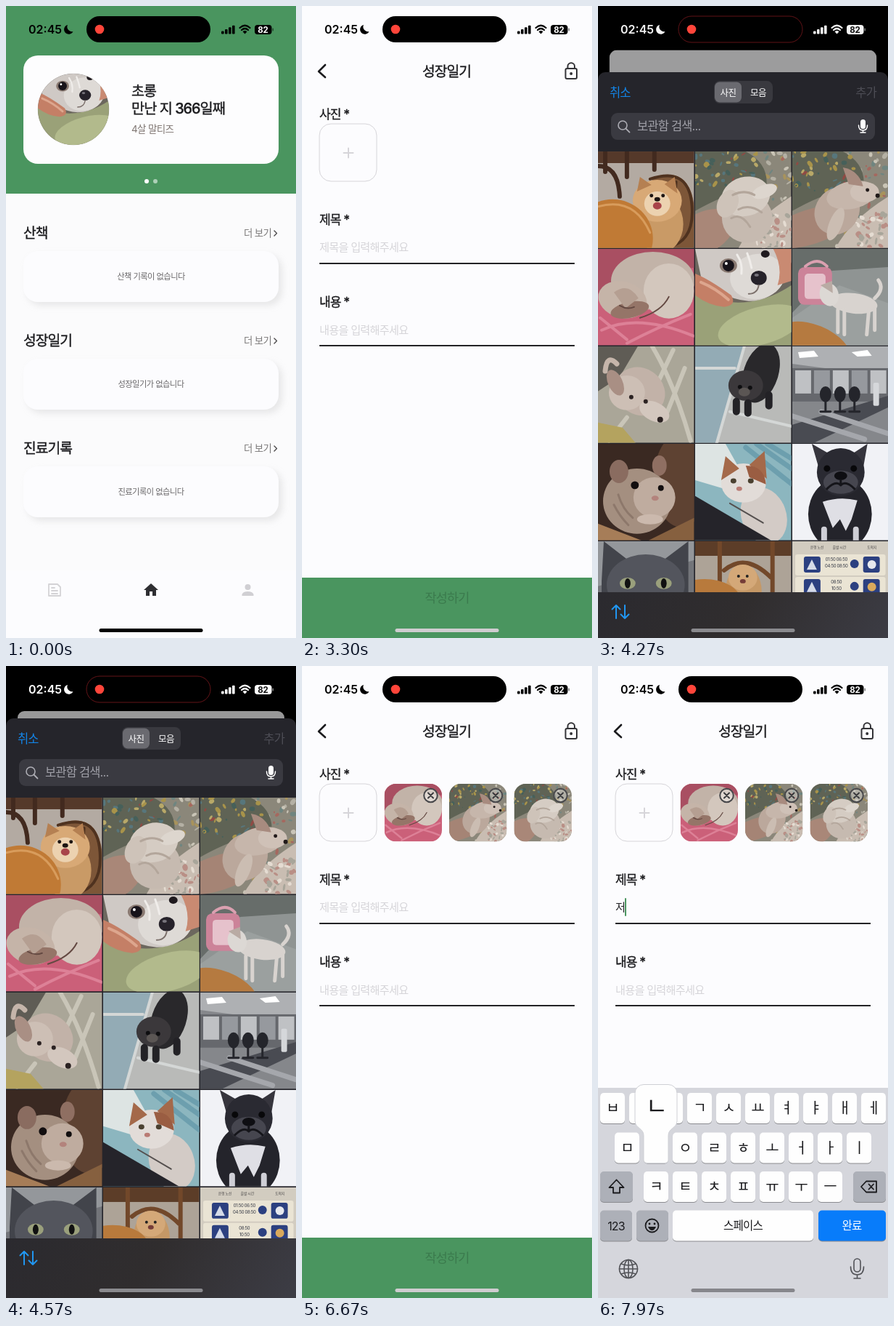
These frames come from a looping animation (400 px wide and 869 px high, 8 s). An HTML page:

```html
<!DOCTYPE html>
<html lang="ko">
<head>
<meta charset="utf-8">
<style>
  html, body { margin: 0; width: 100%; height: 100%; overflow: hidden; background: #000; }
  svg { display: block; }
  #stage { width: 100vw; height: 100vh; }
  text { font-family: Inter, "Noto Sans CJK KR", "Noto Sans CJK", sans-serif; letter-spacing: -.05em; }
  .medium { font-weight: 500; stroke-width: .35; }
  .line { fill: none; stroke-linecap: round; stroke-linejoin: round; }
  .shadow { filter: drop-shadow(5px 5px 4px #e2e2e4cc); }
</style>
</head>
<body>
<script>
const LOOP = 8000, W = 400, H = 869;
const INK = '#1b1b1e', GREEN = '#4a955f', PAPER = '#fcfcfe', PALE = '#d6d5d9', BLUE = '#128af5', DISABLED = '#4d4d55';

// Markup helpers; text is placed by its vertical centre.
const text = (x, y, size, str, fill = INK, anchor = 'start', extra = '') =>
  `<text x="${x}" y="${y + size * .37}" font-size="${size}" fill="${fill}" text-anchor="${anchor}" ${extra}>${str}</text>`;
const title = (x, y, size, str, anchor) => text(x, y, size, str, INK, anchor, `class="medium" stroke="${INK}"`);
const rect = (x, y, w, h, fill, r = 0, extra = '') =>
  `<rect x="${x}" y="${y}" width="${w}" height="${h}" rx="${r}" fill="${fill}" ${extra}/>`;
const oval = (x, y, rx, ry, fill, turn = 0) =>
  `<ellipse cx="${x}" cy="${y}" rx="${rx}" ry="${ry}" fill="${fill}" transform="rotate(${turn} ${x} ${y})"/>`;
const dot = (x, y, r, fill) => oval(x, y, r, r, fill);
const shape = (d, fill) => `<path d="${d}" fill="${fill}"/>`;
const line = (d, stroke = INK, width = 2) => `<path class="line" d="${d}" stroke="${stroke}" stroke-width="${width}"/>`;
const group = (id, body, extra = '') => `<g id="${id}" ${extra}>${body}</g>`;
const photo = (i, x, y, size) => `<use href="#photo${i}" x="${x}" y="${y}" width="${size}" height="${size}"/>`;
const times = (n, fn) => Array.from({ length: n }, (_, i) => fn(i)).join('');

function speckle(seed, n, x, y, w, h, colors) {
  const rnd = () => (seed = seed * 16807 % 2147483647) / 2147483647;
  return times(n, () => oval(x + rnd() * w, y + rnd() * h, 1 + rnd() * 4, 1 + rnd() * 3,
    colors[Math.floor(rnd() * colors.length)], rnd() * 180));
}

const quilt = seed => rect(0, 0, 133, 133, '#8b877a') +
  speckle(seed, 90, 60, 0, 73, 133, ['#c9c4b6', '#a5685f', '#6f8580', '#b4b0a4', '#a8935c']) +
  shape('M133 62V133H60Q80 95 133 62Z', '#c9bdb2') + speckle(seed + 5, 40, 85, 85, 48, 48, ['#e5dcd2', '#b98f86', '#a8a59a']) +
  shape('M0 0H70Q104 18 98 52Q60 48 0 82Z', '#5f6355') +
  speckle(seed + 9, 45, 0, 0, 85, 55, ['#a8934a', '#46605a', '#8f4a44', '#57767c', '#b8a868']);
const pomeranian = rect(0, 0, 133, 133, '#b3aaa2') + rect(0, 0, 133, 16, '#55392a') +
  line('M0 20Q28 20 30 62M10 0V28M40 0V35M78 0V25', '#422a1f', 6) +
  shape('M75 36Q126 18 133 75V133H70Z', '#7d5638') + line('M72 38Q126 20 130 75T88 133M108 42L100 133', '#4f321f', 4) +
  oval(86, 100, 32, 40, '#c99a66') + oval(82, 68, 34, 29, '#d8a976') +
  shape('M54 55L58 35L74 46ZM92 45L106 35L110 58Z', '#b58052') + oval(82, 72, 18, 17, '#ecd2b0') +
  dot(74, 61, 2.5, '#1d1512') + dot(90, 61, 2.5, '#1d1512') + oval(82, 66, 4, 3, '#1d1512') + oval(82, 75, 6, 5, '#a9444a') +
  oval(20, 120, 56, 54, '#c07a35') + line('M0 76Q50 62 72 112', '#d89c5c', 3);

const photos = [
  pomeranian,
  quilt(11) + oval(12, 112, 46, 28, '#a98778', -28) + oval(72, 92, 35, 34, '#c6bab0') + oval(70, 62, 34, 27, '#d5ccc3', -15) +
    oval(96, 55, 18, 9, '#ddd6ce', -20) + oval(45, 72, 14, 20, '#cec3b9', 25) +
    line('M52 60Q68 52 82 60M60 80Q75 72 92 84M50 92Q64 84 76 104', '#b3a69b', 3),
  quilt(57) + oval(25, 104, 62, 24, '#a58475', -18) + oval(62, 82, 30, 34, '#bba89c', 35) + oval(82, 60, 35, 19, '#c6b6ab', -12) +
    oval(100, 56, 20, 14, '#cfc1b7') + shape('M78 45L70 22Q92 26 98 48Z', '#a88b7f') +
    dot(104, 53, 2.5, '#211a1a') + dot(118, 61, 3, '#211a1a') + oval(60, 100, 9, 24, '#cbbdb2', 22),
  rect(0, 0, 133, 133, '#cb6079') + shape('M0 0H133V26Q60 28 0 62Z', '#a94f62') +
    line('M5 112Q55 88 132 120M40 130Q82 108 128 90M3 95L40 125', '#dd8197', 4) + oval(76, 44, 58, 40, '#c2b3a8') +
    oval(98, 58, 35, 38, '#d3c7bd') + oval(34, 70, 34, 25, '#c5b4a8', 15) + oval(44, 84, 27, 11, '#957568', -12) +
    shape('M22 60Q42 45 56 68L38 82Z', '#b59f92') + line('M30 78Q40 84 50 80M58 95Q88 86 98 66', '#644942', 2),
  rect(0, 0, 133, 133, '#6c675e') + shape('M0 60Q70 92 133 50V133H0Z', '#9aa178') + oval(90, 106, 60, 26, '#b2ba8c', -15) +
    shape('M0 0H133V18Q120 72 74 72Q34 68 8 38Z', '#cfc9c5') + oval(86, 38, 38, 31, '#dedad6', -12) +
    shape('M133 0H108Q122 26 114 50L133 44Z', '#c98a72') + shape('M0 34Q20 42 50 64Q58 78 40 80Q18 78 0 64Z', '#c47f66') +
    line('M8 46Q28 54 46 70', '#dda68e', 4) + oval(46, 23, 12, 10, '#8a7a72') + dot(46, 23, 8, '#17131a') + dot(43, 20, 2, '#fff') +
    oval(97, 7, 6, 5, '#1f1a1e') + oval(88, 40, 11, 10, '#26222a') + oval(85, 36, 3, 2, '#77747c') + line('M88 50Q86 62 74 62', '#7d716c', 2) +
    line('M58 8Q66 20 64 34M72 6Q76 16 78 26', '#f0edea', 3),
  rect(0, 0, 133, 133, '#8f9493') + shape('M0 0H133V25L55 30L0 88Z', '#676d6a') + shape('M0 95L65 50L133 75V133H0Z', '#9ba09f') +
    rect(8, 25, 47, 52, '#cc8399', 9) + rect(17, 34, 29, 35, '#e6c2cc', 5) + line('M18 24Q35 10 48 24', '#daa0b0', 4) +
    oval(85, 75, 33, 14, '#d8d3cf', 7) + oval(51, 63, 13, 16, '#dcd8d4', -15) + shape('M39 50L55 44L56 61Z', '#b9aba4') +
    line('M63 84V115M72 85V118M106 83L103 118M114 82V112M114 68Q128 55 119 43', '#d8d3cf', 5) + oval(30, 131, 52, 26, '#b57a40', 22),
  rect(0, 0, 133, 133, '#aaa698') + shape('M0 0H55L30 42L0 62Z', '#5f5c55') +
    line('M75 0Q105 50 128 130M104 5L78 60M15 130L40 98M120 30L96 90', '#c9c5b8', 6) + shape('M0 105L34 112L52 133H0Z', '#b4a35f') +
    oval(58, 62, 36, 32, '#c2b2a8', 35) + oval(40, 64, 25, 24, '#cdbfb5') + oval(24, 50, 10, 19, '#a98f84', -25) +
    oval(78, 90, 22, 13, '#d3c7be', 25) + dot(46, 70, 3, '#2b2222') + dot(86, 101, 4, '#2b2222') + dot(66, 76, 3, '#2b2222') + line('M26 24Q12 10 10 34', '#c5b5aa', 7),
  rect(0, 0, 133, 133, '#b9bab8') + shape('M0 0H68L30 133H0Z', '#93abb5') + line('M68 0L30 133M0 30H55M48 90L133 110', '#d4d7d6', 4) +
    oval(91, 37, 24, 42, '#29282b', 18) + oval(70, 54, 24, 21, '#3b383b') + dot(62, 56, 3, '#0e0e10') + dot(76, 57, 3, '#0e0e10') + oval(68, 63, 8, 6, '#5b5654') +
    line('M57 76V90M73 78V92M102 67V82', '#232226', 10),
  rect(0, 0, 133, 133, '#85878b') + shape('M0 0H133V30L90 36L0 24Z', '#aeb0b3') + shape('M8 8L30 6L36 14L10 16ZM82 8L104 5L110 13L90 14Z', '#fff') +
    rect(0, 30, 133, 46, '#66686d') + times(5, i => rect(4 + i * 26, 33, 22, 32, i % 2 ? '#96999e' : '#bfc1c4')) +
    shape('M0 108L133 68V84L30 133H0Z', '#494b52') + line('M0 96L100 128M40 90L132 120', '#a5a7ac', 7) +
    times(3, i => oval(46 + i * 20, 66, 8, 11, '#24252b') + line(`M${46 + i * 20} 74V88M${39 + i * 20} 90H${53 + i * 20}`, '#24252b', 3)) +
    rect(112, 50, 8, 32, '#d5d7da', 2),
  rect(0, 0, 133, 133, '#3a2922') + oval(115, 50, 38, 65, '#5e4232') + shape('M0 110L60 133H0Z', '#a67d58') + shape('M70 133L133 102V133Z', '#86603f') +
    oval(54, 79, 47, 45, '#a48f80') + oval(78, 74, 29, 28, '#bfac9f') + oval(29, 38, 13, 16, '#8a6c60') + oval(85, 30, 10, 14, '#8f6f62') +
    dot(51, 57, 5.5, '#120e0f') + dot(87, 61, 4, '#120e0f') + oval(79, 75, 5, 3.5, '#b3837c') + oval(72, 104, 18, 7, '#cbb9ad') +
    line('M28 70Q34 90 48 102M22 84Q30 100 42 112', '#8d786b', 3),
  rect(0, 0, 133, 133, '#8cb6bf') + shape('M0 0H42L84 75L0 50Z', '#dde4e3') + line('M85 0L133 34M100 0L133 20M70 5L133 55', '#6d9fae', 7) +
    oval(95, 99, 31, 40, '#d3cbc6', -20) + oval(67, 54, 31, 27, '#e2dcd8') + shape('M36 50L42 17L61 34ZM75 29L96 10L99 48Z', '#a4694a') +
    shape('M70 30Q96 30 98 56L75 46Z', '#9a5d42') + oval(53, 51, 4, 3.5, '#4a4030') + oval(77, 51, 4, 3.5, '#4a4030') + oval(61, 62, 4, 3, '#b97b74') +
    shape('M0 72L105 133H0Z', '#25242a') + line('M48 82L94 109', '#55504f', 2),
  rect(0, 0, 133, 133, '#f1f2f6') + oval(66, 97, 44, 50, '#24242b') + shape('M36 31L27 0L57 17ZM78 17L104 0L98 34Z', '#36353d') + oval(67, 39, 33, 33, '#2a2a32') +
    oval(67, 53, 24, 16, '#46464f') + dot(48, 34, 4.5, '#08080a') + dot(85, 34, 4.5, '#08080a') + oval(67, 44, 9, 6, '#0e0e12') +
    line('M67 50V57M48 62Q60 50 67 57Q74 50 86 62', '#15151a', 3) + shape('M42 80Q66 72 90 78L82 104L74 120L66 104L56 116Z', '#dfdfe5') +
    line('M44 118V133M88 118V133', '#cfcfd6', 8),
  rect(0, 0, 133, 133, '#73757a') + shape('M0 0H133V26L0 62Z', '#94979b') + shape('M5 55L8 0L47 30H85L125 0V133H5Z', '#42444b') +
    oval(66, 60, 54, 42, '#53555d') + oval(41, 58, 11, 8, '#9aa07c') + oval(91, 58, 11, 8, '#9aa07c') + oval(41, 58, 4, 7, '#111') + oval(91, 58, 4, 7, '#111'),
  rect(0, 0, 133, 133, '#ada397') + rect(0, 0, 133, 20, '#5c3d28') + line('M34 0V60M107 0V72M40 40Q70 15 105 50', '#72482a', 6) +
    oval(67, 69, 25, 36, '#c59866') + oval(66, 50, 20, 18, '#d4a878') + dot(60, 48, 2, '#222') + dot(72, 48, 2, '#222') + oval(66, 55, 4, 3, '#753c38') + oval(13, 82, 50, 30, '#b87a3c'),
  rect(0, 0, 133, 133, '#d2ccc0') + times(2, i => rect(4, 18 + i * 31, 125, 29, '#eae4d4', 3) +
    rect(16, 21 + i * 31, 23, 22, '#2c4080', 3) + shape(`M20 ${39 + i * 31}L27 ${25 + i * 31}L34 ${39 + i * 31}Z`, '#d5dbe8') +
    text(61, 25 + i * 31, 6, i ? '08:50' : '01:50 06:50', '#343844', 'middle') + text(61, 34 + i * 31, 6, i ? '10:50' : '04:50 08:50', '#343844', 'middle') +
    dot(86, 31 + i * 31, 6, '#2c4080') + rect(98, 21 + i * 31, 23, 22, '#2c4080', 3) + dot(110, 32 + i * 31, 6, i ? '#d9a95c' : '#e6e8ee')) +
    text(34, 8, 5, '운행 노선', '#4c4a4a', 'middle') + text(65, 8, 5, '출발 시간', '#4c4a4a', 'middle') + text(110, 8, 5, '도착지', '#4c4a4a', 'middle')
];

const backArrow = line('M32 81L23 90L32 98', INK, 2.6);

function homePage() {
  const section = (y, name, message) => title(24, y, 19.3, name) + text(328, y, 13.4, '더 보기', '#7c7a7a') +
    line(`M370 ${y - 3}L373.5 ${y + .5}L370 ${y + 4}`, '#4a484a', 1.4) +
    rect(24, y + 25, 352, 70, PAPER, 20, 'class="shadow"') + text(200, y + 60, 11.3, message, '#6a686a', 'middle');
  return rect(0, 0, W, H, '#fbfbfc') + rect(0, 0, W, 258, GREEN) + rect(24, 68, 352, 149, '#fdfdfe', 20) +
    '<circle cx="93" cy="142" r="49" fill="none" stroke="#dcdce0"/>' +
    group('petPhoto', photo(4, 44, 93, 98.5), 'clip-path="url(#petClip)"') +
    title(173, 117, 19.5, '초롱') + title(173, 141, 19.8, '만난 지 366일째') + text(173, 169, 13.5, '4살 말티즈', '#7f7672') +
    dot(194, 241, 3, '#fff') + dot(206, 241, 3, '#add0b7') +
    section(312, '산책', '산책 기록이 없습니다') + section(460, '성장일기', '성장일기가 없습니다') + section(608, '진료기록', '진료기록이 없습니다') +
    rect(0, 776, W, 93, PAPER) +
    line('M59 795H71L75 799V811H59ZM63 800H67M63 804H71M63 808H71', '#d4d3d6', 1.8) +
    shape('M200 794L190 803H193V811H198V805H202V811H207V803H210Z', '#2e2e32') +
    dot(333.5, 799, 4, '#d0cfd3') + shape('M325.5 811V809Q327 805 333.5 805T341.5 809V811Z', '#d0cfd3');
}

const listPage = () => rect(0, 0, W, H, PAPER) + backArrow + title(199.5, 90, 19.3, '성장일기', 'middle') +
  text(200, 485, 11.3, '작성한 성장일기가', '#38373a', 'middle') + text(200, 502, 11.3, '없습니다', '#38373a', 'middle');

function writePage() {
  const thumb = (i, x) => `<g transform="translate(${x} 162)"><g clip-path="url(#thumbClip)">${photo(i, 0, 0, 79.5)}</g>` +
    dot(64, 16, 10, '#ffffff55') + '<circle cx="64" cy="16" r="9.3" fill="none" stroke="#47474a" stroke-width="2"/>' +
    line('M60.5 12.5L67.5 19.5M67.5 12.5L60.5 19.5', '#3a3a3d') + '</g>';
  return rect(0, 0, W, H, PAPER) + backArrow + title(199.5, 90, 19.3, '성장일기', 'middle') +
    '<rect x="363.5" y="86" width="15.5" height="14" rx="2" fill="none" stroke="#343438" stroke-width="2"/>' +
    line('M366.5 86V83A4.7 4.7 0 0 1 376 83V86', '#343438') + dot(371.2, 93, 2, '#343438') +
    title(24, 149, 17, '사진 *') + rect(24, 162, 79, 79, 'none', 16, `stroke="${PALE}"`) +
    line('M57.5 202H70.5M64 195.5V208.5', PALE) +
    group('thumbs', thumb(3, 113.5) + thumb(2, 203) + thumb(1, 292.5)) +
    title(24, 294, 17, '제목 *') + group('hint', text(24, 331, 15.2, '제목을 입력해주세요', PALE)) +
    '<text id="typed" x="24" y="336.6" font-size="15.2" fill="#262629"></text>' +
    rect(37, 319, 2, 25, GREEN, 1, 'id="caret"') + rect(24, 353, 352, 2, '#232326') +
    title(24, 407, 17, '내용 *') + text(24, 445, 15.2, '내용을 입력해주세요', PALE) + rect(24, 466, 352, 2, '#232326') +
    rect(0, 786, W, 83, GREEN) + text(200, 814, 17.5, '작성하기', '#3b7a4d', 'middle');
}

// The sheet's own origin is its top edge.
function pickerSheet() {
  const tile = i => photo(i, i % 3 * 134, 109 + Math.floor(i / 3) * 134, 132.6);
  const check = i => {
    const x = i % 3 * 134, y = 109 + Math.floor(i / 3) * 134;
    return group('check' + i, rect(x, y, 132.6, 132.6, '#00000055') +
      `<circle cx="${x + 115}" cy="${y + 115}" r="10" fill="${BLUE}" stroke="#fff" stroke-width="1.5"/>` +
      line(`M${x + 110} ${y + 115.5}l4 4l6 -8.5`, '#fff', 1.6));
  };
  return rect(0, 0, W, 900, '#25252b', 10) + text(16, 28, 16.5, '취소', '#1385e8') +
    rect(160, 12, 81, 31, '#39393f', 8) + rect(161, 13.5, 37, 28, '#6a6a70', 7) +
    text(179.5, 28, 12.5, '사진', '#fff', 'middle') + text(221, 28, 12.5, '모음', '#fff', 'middle') +
    text(384, 28, 16.5, '추가', DISABLED, 'end', 'id="add"') +
    rect(18, 56, 364, 37, '#3a3a41', 9) + '<circle cx="34" cy="73" r="6" fill="none" stroke="#adadb4" stroke-width="1.6"/>' +
    line('M38.5 77.5L43.5 82.5', '#adadb4', 1.8) + text(54, 74, 16.5, '보관함 검색...', '#a0a0a8') +
    rect(362, 65, 7, 13, '#fff', 3.5) + line('M359.5 73Q359.5 80 365.5 80T371.5 73M365.5 80V83M362 83H369', '#fff', 1.5) +
    times(15, tile) + check(1) + check(2) + check(3) + rect(0, 715, W, 200, 'url(#toolbar)') +
    line('M25 751V733M19.5 738.5L25 733L30.5 738.5M37 733V751M31.5 745.5L37 751L42.5 745.5', '#2196f0', 2);
}

const rows = [['ㅂㅈㄷㄱㅅㅛㅕㅑㅐㅔ', 3, 587], ['ㅁㄴㅇㄹㅎㅗㅓㅏㅣ', 23, 641.5], ['ㅋㅌㅊㅍㅠㅜㅡ', 63, 695]];
const key = (x, y, w, fill = '#fefefe') => rect(x, y + 1, w, 42, '#8b8c90', 5) + rect(x, y, w, 42, fill, 5);

function keyboard() {
  const grey = '#adb0b8';
  return rect(0, 580, W, 300, '#d5d6dc') +
    rows.map(([letters, x, y]) => [...letters].map((c, i) => key(x + i * 40, y, 34) + text(x + i * 40 + 17, y + 21, 20, c, INK, 'middle')).join('')).join('') +
    key(3, 695, 45, grey) + line('M25.5 706.5L15.5 717H21V724.5H30V717H35.5Z', INK, 1.8) +
    key(352, 695, 45, grey) + line('M363 716L370 708.5H384V723.5H370ZM373.5 712.5L380 719.5M380 712.5L373.5 719.5', INK, 1.8) +
    key(3, 748.5, 44, grey) + text(25, 770, 16, '123', INK, 'middle') + key(53, 748.5, 44, grey) +
    `<circle cx="74.5" cy="769.5" r="9" fill="none" stroke="${INK}" stroke-width="1.8"/>` + dot(71, 767, 1.4, INK) + dot(78, 767, 1.4, INK) +
    shape('M69 771H80Q78 776 74.5 776T69 771Z', INK) +
    key(103, 748.5, 194) + text(200, 769, 15.5, '스페이스', INK, 'middle') + key(304, 748.5, 93, '#087cfa') + text(350, 769, 15.5, '완료', '#fff', 'middle') +
    '<g class="line" stroke="#525358" stroke-width="1.6"><circle cx="42" cy="829" r="12.5"/><ellipse cx="42" cy="829" rx="6" ry="12.5"/>' +
    '<path d="M42 816.5V841.5M29.5 829H54.5M32 822Q42 826 52 822M32 836Q42 832 52 836"/>' +
    '<rect x="353" y="815" width="9" height="18" rx="4.5"/><path d="M348.5 826Q348.5 837 357.5 837T366.5 826M357.5 837V842M353 842H362"/></g>' +
    group('popup', '');
}

function keyPopup(letter) {
  const [letters, left, y] = rows.find(row => row[0].includes(letter));
  const x = left + letters.indexOf(letter) * 40;
  return `<path d="M${x - 12} ${y - 54}a12 12 0 0 1 12 -12h34a12 12 0 0 1 12 12v38c0 10 -12 10 -12 20v33q0 5 -5 5h-24q-5 0 -5 -5v-33c0 -10 -12 -10 -12 -20z" fill="#fefefe" stroke="#cfd0d5"/>` +
    text(x + 17, y - 37, 33, letter, INK, 'middle');
}

const statusBar = () => rect(111, 14, 171, 36, '#000', 18, 'id="island"') + dot(129, 32, 6.3, '#ff453a') +
  '<g id="status" fill="currentColor">' + text(31, 32.5, 16, '02:45', 'currentColor', 'start', 'font-weight="600" style="letter-spacing:0"') +
  shape('M85 26A6.5 6.5 0 1 0 92.5 35A6.5 6.5 0 0 1 85 26Z', 'currentColor') +
  times(4, i => rect(297 + i * 5, 34.5 - i * 2.6, 3.6, 4 + i * 2.6, 'currentColor', 1)) +
  line('M322.5 30Q329.5 23.5 336.5 30M325 33Q329.5 29 334 33', 'currentColor', 2.2) + shape('M326.5 35.2Q329.5 33 332.5 35.2L329.5 38.5Z', 'currentColor') +
  rect(343, 26, 23.5, 13, 'currentColor', 4) + rect(367.5, 30.5, 1.5, 4, 'currentColor', .7, 'opacity=".5"') +
  text(354.5, 32.5, 11.5, '82', '#fff', 'middle', 'id="charge" font-weight="700" style="letter-spacing:0"') + '</g>';

document.body.innerHTML = `<svg id="stage" viewBox="0 0 ${W} ${H}"><defs>
  ${photos.map((art, i) => `<symbol id="photo${i}" viewBox="0 0 133 133">${art}</symbol>`).join('')}
  <clipPath id="petClip"><circle cx="93" cy="142" r="49"/></clipPath>
  <clipPath id="thumbClip"><rect width="79.5" height="79.5" rx="16"/></clipPath>
  <clipPath id="cardClip"><rect id="cardShape" width="400" height="900"/></clipPath>
  <linearGradient id="toolbar" x2="1" y2=".3"><stop stop-color="#2b2a2f"/><stop offset=".5" stop-color="#302d2e"/><stop offset="1" stop-color="#3c3c44"/></linearGradient></defs>
  ${group('home', homePage())}${group('list', listPage())}
  ${group('write', `<g clip-path="url(#cardClip)">${writePage()}</g>`)}
  ${rect(0, 0, W, H, '#000', 0, 'id="dim"')}${group('sheet', pickerSheet())}${group('keys', keyboard())}
  ${statusBar()}${rect(128.5, 856, 143, 5, '#000', 2.5, 'id="indicator"')}</svg>`;

const $ = id => document.getElementById(id);
const set = (id, name, value) => $(id).setAttribute(name, value);
const show = (id, on) => set(id, 'display', on ? 'inline' : 'none');
const shift = (id, x, y = 0) => set(id, 'transform', `translate(${x} ${y})`);

// Critically damped spring from 0 to 1.
function spring(ms) {
  const u = Math.max(0, ms) * .015;
  return u > 10 ? 1 : 1 - (1 + u) * Math.exp(-u);
}
// Value of the last [start, value] step that has begun.
const stepAt = (t, steps) => steps.filter(([start]) => t >= start).pop()[1];

let shownPopup = '';

function render(t) {
  const listIn = spring(t - 1797), writeIn = spring(t - 2600);
  const leaving = t >= 5931;
  const up = leaving ? 1 - spring(t - 5931) : spring(t - 3896);
  const keysIn = spring(t - 6950);

  show('home', listIn < 1);
  show('petPhoto', listIn === 0);
  shift('home', -128 * listIn);
  show('list', listIn > 0 && writeIn < 1);
  shift('list', W * (1 - listIn) - 128 * writeIn);
  show('write', writeIn > 0);
  set('write', 'transform', `translate(${W * (1 - writeIn) + 16 * up} ${62 * up}) scale(${1 - .08 * up})`);
  set('cardShape', 'rx', up > .002 ? 10 + 70 * (1 - up) : 0);

  set('dim', 'opacity', leaving ? Math.max(0, .4 - 1.4 * (1 - up)) : .4 * up ** 1.5);
  show('sheet', up > 0);
  shift('sheet', 0, H - 797 * up);
  show('check1', t >= 4850);
  show('check2', t >= 5150);
  show('check3', t >= 5450);
  set('add', 'fill', t >= 4850 ? BLUE : DISABLED);
  show('thumbs', t >= 6350);

  show('keys', keysIn > 0);
  shift('keys', 0, 289 * (1 - keysIn));
  const typed = stepAt(t, [[0, ''], [7520, 'ㅈ'], [7760, '저']]);
  $('typed').textContent = typed;
  show('hint', !typed);
  show('caret', t >= 6900);
  set('caret', 'x', typed ? 37 : 24);
  const pressed = stepAt(t, [[0, ''], [7400, 'ㅈ'], [7520, ''], [7640, 'ㅓ'], [7760, ''], [7930, 'ㄴ']]);
  if (pressed !== shownPopup) $('popup').innerHTML = pressed ? keyPopup(pressed) : '';
  shownPopup = pressed;

  const white = Math.round(255 * (leaving ? Math.min(1, up * 1.5) : up * up));
  $('status').style.color = `rgb(${white},${white},${white})`;
  set('charge', 'fill', white > 100 ? '#111' : '#fff');
  set('island', 'stroke', `rgba(100,20,24,${up})`);
  set('indicator', 'fill', stepAt(t, [[0, '#000'], [2750, '#cfcdd0'], [3950, '#29292e'], [4250, '#8a8a8e'], [6300, '#cfcdd0'], [7100, '#86868b']]));
}

const began = performance.now();
function frame() {
  render((performance.now() - began) % LOOP);
  requestAnimationFrame(frame);
}
frame();
</script>
</body>
</html>
```
